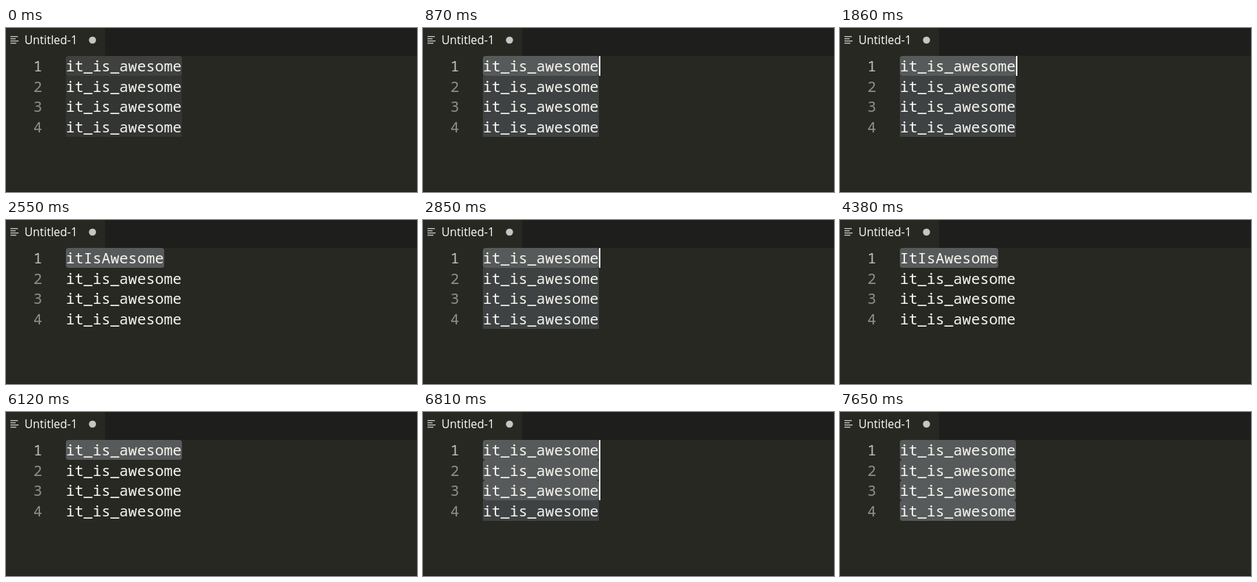
Write an HTML page with a canvas that moves like this. It is 556 by 223 pixels and loops after 8000 ms.

```html
<!DOCTYPE html>
<html lang="en">
<head>
<meta charset="utf-8">
<style>
html, body { margin: 0; width: 100%; height: 100%; overflow: hidden; background: #272822; }
canvas { display: block; }
</style>
</head>
<body>
<canvas id="stage" width="556" height="223"></canvas>
<script>
const ctx = document.getElementById('stage').getContext('2d', { alpha: false });
const LOOP = 8000;
const LEFT = 81, TOP = 38.5, ROW = 27.5, CHAR = 12.05;
const CODE_FONT = '20px "Noto Sans Mono", "DejaVu Sans Mono", monospace';
const TAB_FONT = '15.5px "Open Sans", "Noto Sans", sans-serif';

const SNAKE = 'it_is_awesome', CAMEL = 'itIsAwesome';
const CONSTANT = 'IT_IS_AWESOME', PASCAL = 'ItIsAwesome';

// Each step overrides part of the editor state from its time on.
const steps = [
  [0, { text: SNAKE, focus: false, matches: true, caret: false, selected: 1 }],
  [870, { focus: true, caret: true }],
  [1380, { caret: false }],
  [1860, { caret: true }],
  [2070, { text: CAMEL, matches: false }],
  [2550, { caret: false }],
  [2850, { text: SNAKE, matches: true, caret: true }],
  [3330, { caret: false }],
  [3390, { text: CONSTANT }],
  [3810, { caret: true }],
  [3900, { text: PASCAL, matches: false }],
  [4380, { caret: false }],
  [4680, { text: CONSTANT, caret: true }],
  [5160, { caret: false }],
  [5190, { text: SNAKE }],
  [5640, { caret: true }],
  [6120, { caret: false }],
  [6480, { selected: 2, matches: true, caret: true }],
  [6810, { selected: 3 }],
  [7170, { selected: 4 }],
  [7650, { caret: false }]
];

function stateAt(t) {
  const state = {};
  for (const [start, change] of steps) if (t >= start) Object.assign(state, change);
  return state;
}

function rect(color, x, y, w, h) {
  ctx.fillStyle = color;
  ctx.fillRect(x, y, w, h);
}

function label(text, x, y, color, font, spacing = 0) {
  ctx.font = font;
  ctx.letterSpacing = spacing + 'px';
  ctx.fillStyle = color;
  ctx.fillText(text, x, y);
}

function drawTab() {
  rect('#1e1f1c', 0, 0, 556, 38);
  rect('#272822', 0, 0, 134, 38);
  [10, 7, 11, 8].forEach((w, i) => rect('#c5c5c5', 6, 11 + i * 3, w, 1.3));
  label('Untitled-1', 25, 22, '#ffffff', TAB_FONT);
  ctx.fillStyle = '#c5c5c5';
  ctx.beginPath();
  ctx.arc(117, 16.5, 4.8, 0, Math.PI * 2);
  ctx.fill();
}

function drawLine(i, state) {
  const text = i ? SNAKE : state.text;
  const y = Math.round(TOP + i * ROW - 0.6);
  const h = Math.round(TOP + (i + 1) * ROW - 0.6) - y;
  const right = Math.round(LEFT + text.length * CHAR);
  const base = Math.round(59 + i * ROW);

  if (i < state.selected) {
    ctx.fillStyle = state.focus ? '#575a5a' : '#3f413e';
    ctx.beginPath();
    ctx.roundRect(LEFT, y, right - LEFT, h, 3.5);
    ctx.fill();
  } else if (state.matches) {
    rect(state.focus ? '#3f4242' : '#333532', LEFT, y, right - LEFT, h);
  }
  label(String(i + 1), 37, base, i ? '#90908a' : '#c2c2bf', CODE_FONT);
  label(text, LEFT, base, '#f8f8f2', CODE_FONT, CHAR - 12);
  if (state.caret && i < state.selected) rect('#f8f8f0', right, y, 2, h);
}

function draw(t) {
  const state = stateAt(t);
  rect('#272822', 0, 0, 556, 223);
  drawTab();
  for (let i = 0; i < 4; i++) drawLine(i, state);
  rect('#1e1f1c', 0, 222, 556, 1);
}

const begin = performance.now();
function tick() {
  draw((performance.now() - begin) % LOOP);
  requestAnimationFrame(tick);
}
tick();
</script>
</body>
</html>
```
